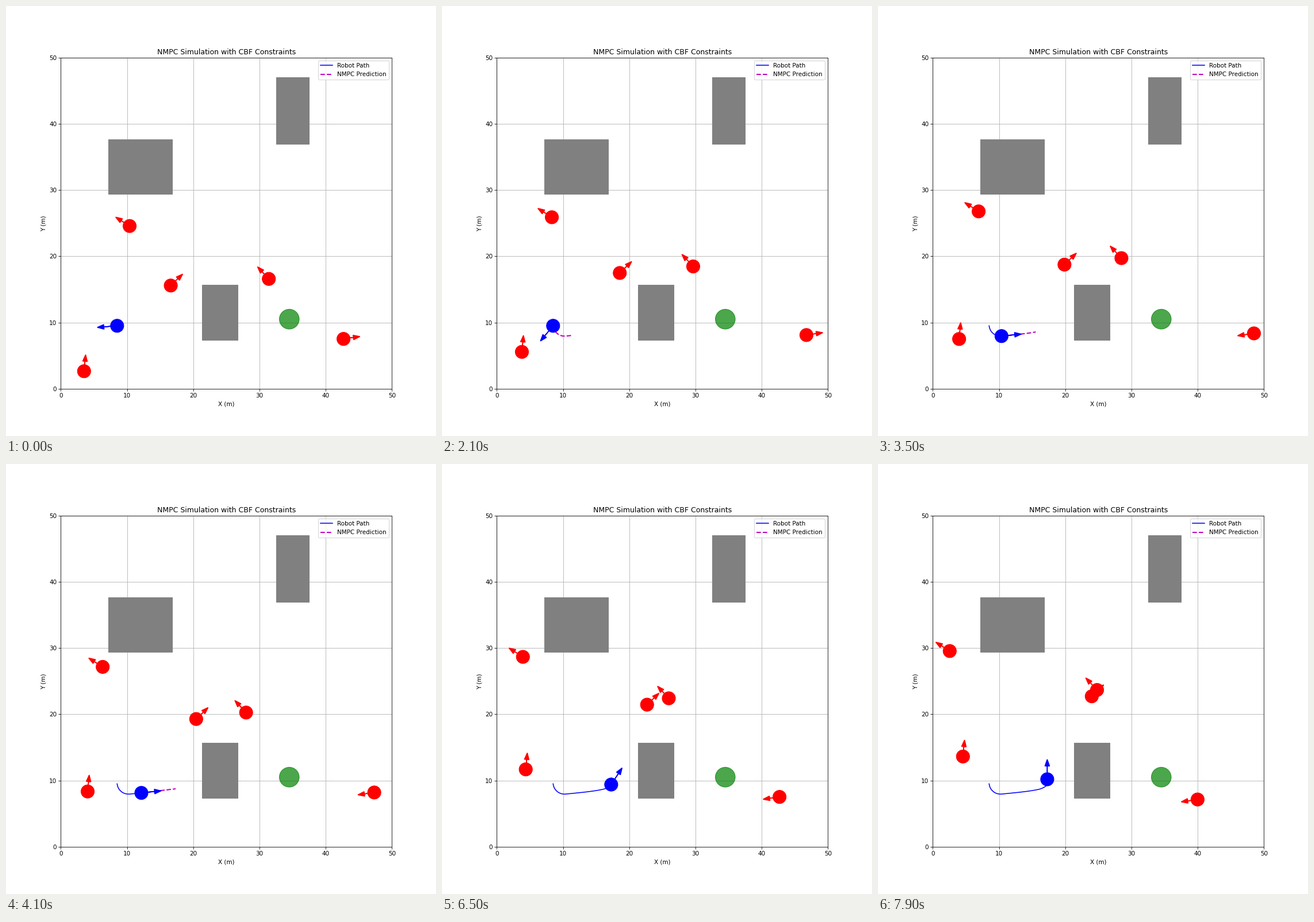
Animation of 748 by 748 pixels, one loop 8000 ms. Source, as a matplotlib script:

```python
import numpy as np
import matplotlib.pyplot as plt
from matplotlib.animation import FuncAnimation
from matplotlib.patches import Circle, Rectangle

FRAMES = 80
STEP = 0.3                      # cruising distance per frame
HORIZON = 17.36                 # predicted steps
TURN_START, TURN_END = 16.43, 35
GO, CRUISE_END, BRAKE_END = 26, 53, 65
REST = np.array([17.28, 10.43])

# x, y, dx, dy per frame
WALKERS = [
    (10.39, 24.57, -0.0992, 0.0630),
    (16.60, 15.58, 0.0937, 0.0903),
    (31.41, 16.58, -0.0837, 0.0897),
    (42.69, 7.52, 0.1934, 0.0278),
    (3.51, 2.64, 0.0132, 0.1390),
]
BOXES = [(7.17, 29.38, 9.65, 8.24), (32.5, 37, 5, 10), (21.3, 7.38, 5.42, 8.28)]


def heading(i):
    """Robot heading in degrees."""
    if i < TURN_END:
        return min(184.6 + 10 * max(i - TURN_START, 0), 365.7)
    if i < CRUISE_END:
        return 365.7 + 5.9 * ((i - TURN_END) / 18) ** 3
    if i < BRAKE_END:
        return 371.6 + 45.2 * ((i - CRUISE_END) / 12) ** 0.9
    return min(416.8 + 10 * (i - BRAKE_END), 450)


def unit(deg):
    a = np.radians(deg)
    return np.array([np.cos(a), np.sin(a)])


def drive():
    """Robot position at every frame."""
    p = np.array([8.5, 9.5])
    out = [p]
    for i in range(FRAMES - 1):
        if i >= BRAKE_END:
            p = p + (REST - p) * 0.097
        elif i >= GO:
            p = p + STEP * 0.857 ** max(i - CRUISE_END, 0) * unit(heading(i))
        out.append(p)
    return np.array(out)


route = drive()


def predict(i):
    """Points of the predicted path."""
    p = route[i]
    if i <= TURN_START:
        return np.array([p, p])
    if i < 36:
        t = np.append(np.arange(i, int(i + HORIZON) + 1), i + HORIZON)
        k = np.arange(FRAMES)
        return np.column_stack([np.interp(t, k, route[:, d]) for d in (0, 1)])
    if i <= 41:
        return np.array([p, p + HORIZON * STEP * unit(6.8)])
    if i < CRUISE_END:
        w = (i - 41) / 12
        slope = np.tan(np.radians(heading(i) + 0.8))
        wall_y = p[1] + slope * (REST[0] - p[0])
        bend = REST[0] - 0.56 * w
        end = 8.7 + (REST[1] - 8.7) * w
        return np.array([p, (bend, p[1] + slope * (bend - p[0])),
                         (REST[0], min(wall_y + 0.43 * w, end)), (REST[0], end)])
    return np.vstack([route[i:max(i, BRAKE_END) + 1], REST])


def walker_state(n, i):
    """Position and direction of a walker; one turns back at the border."""
    x, y, dx, dy = WALKERS[n]
    k, sign = (65 - i, -1) if n == 3 and i > 32 else (i, 1)
    v = np.array([dx, dy])
    return np.array([x, y]) + k * v, sign * v / np.hypot(dx, dy)


fig, ax = plt.subplots(figsize=(10, 10), dpi=74.8)
ax.set_xlim(0, 50)
ax.set_ylim(0, 50)
ax.set_aspect("equal")
ax.set_axisbelow(True)
ax.grid(True)
ax.set_title("NMPC Simulation with CBF Constraints")
ax.set_xlabel("X (m)")
ax.set_ylabel("Y (m)")

for x, y, w, h in BOXES:
    ax.add_patch(Rectangle((x, y), w, h, color="gray"))
ax.add_patch(Circle((34.5, 10.5), 1.5, color="green", alpha=0.7))

path_line, = ax.plot([], [], "b-", lw=1.5, label="Robot Path")
pred_line, = ax.plot([], [], "m--", lw=2, label="NMPC Prediction")
ax.legend(loc="upper right")


def make_body(color):
    disc = ax.add_patch(Circle((0, 0), 1, color=color, zorder=3))
    arrow = ax.arrow(0, 0, 1, 0, head_width=0.7, head_length=1,
                     color=color, lw=1.5, zorder=3)
    return disc, arrow


def place(body, pos, direction, length):
    disc, arrow = body
    disc.center = tuple(pos)
    dx, dy = direction * length
    arrow.set_data(x=pos[0], y=pos[1], dx=dx, dy=dy)


robot = make_body("blue")
walkers = [make_body("red") for _ in WALKERS]


def update(i):
    path_line.set_data(*route[:i + 1].T)
    pred_line.set_data(*predict(i).T)
    place(robot, route[i], unit(heading(i)), 2)
    for n, body in enumerate(walkers):
        place(body, *walker_state(n, i), 1.5)
    return []


anim = FuncAnimation(fig, update, frames=FRAMES, init_func=lambda: [],
                     interval=100, repeat=True, repeat_delay=0, blit=False)
plt.show()
```
